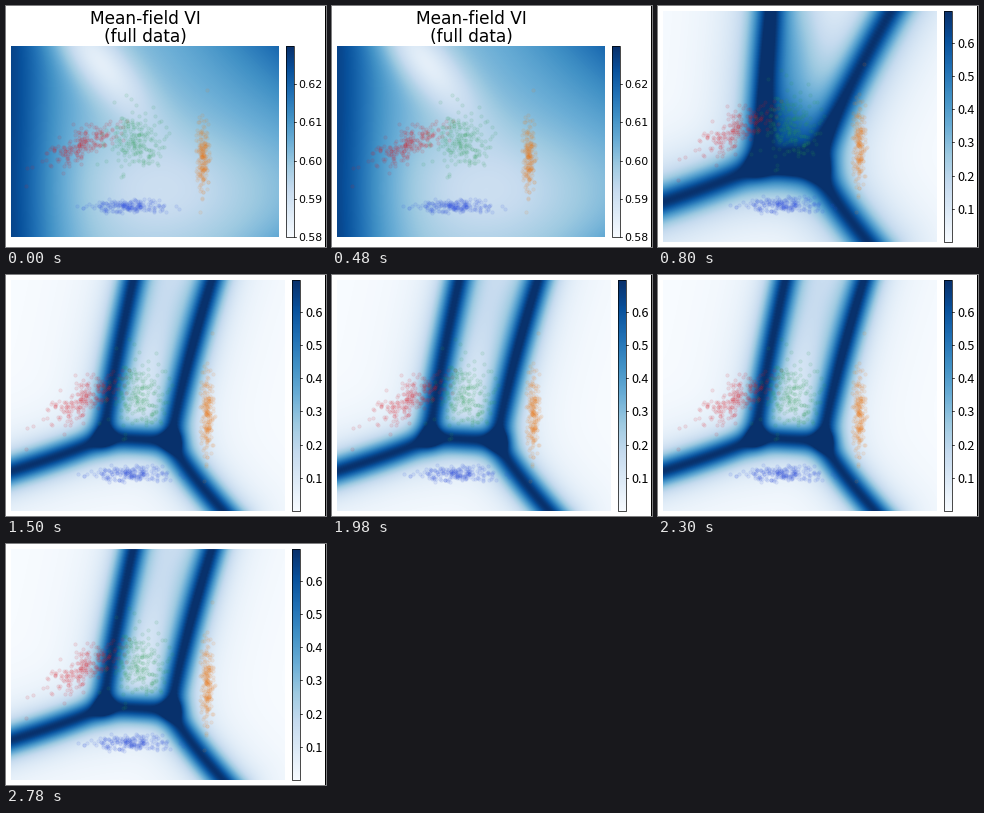
Animation, 320 px wide and 241 px high, one loop 3100 ms. Source, as a matplotlib script:

```python
import numpy as np
import matplotlib.pyplot as plt
from matplotlib.animation import ArtistAnimation
from matplotlib.patches import Rectangle

W, H, DPI = 320, 241, 72
LN2 = np.log(2)
WIDE = (5, 5, 279, 236)
TITLED = (5, 40, 273, 231)

fig = plt.figure(figsize=(W / DPI, H / DPI), dpi=DPI, facecolor="white")
ax = fig.add_axes([0, 0, 1, 1])
ax.set_axis_off()

gx, gy = np.meshgrid(np.arange(5.5, 279), np.arange(5.5, 236))


def blob(x, y, sx, sy, angle=0):
    """Gaussian bump, its long axis turned by angle degrees."""
    c, s = np.cos(np.radians(angle)), np.sin(np.radians(angle))
    u = (gx - x) * c + (gy - y) * s
    v = (gy - y) * c - (gx - x) * s
    return np.exp(-(u / sx) ** 2 / 2 - (v / sy) ** 2 / 2)


def entropy(z):
    """Binary entropy of a sigmoid at logit z."""
    return np.log1p(np.exp(-z)) + z / (1 + np.exp(z))


def ridge(start, end, width, halo):
    """Entropy around a slightly bent line that runs on past its end."""
    t = np.linspace(0, 1.15, 60)
    xs = start[0] + (end[0] - start[0]) * t ** 1.2
    ys = start[1] + (end[1] - start[1]) * t
    dist = np.sqrt(np.min([(gx - x) ** 2 + (gy - y) ** 2 for x, y in zip(xs, ys)], axis=0))
    return (1 - halo) * entropy(dist / width) + halo * entropy(dist / (3 * width))


def boundaries(left, right, tops, foot, width, halo, glow):
    """Class borders that meet in two junctions."""
    bridge_end = tuple(np.array(left) + (np.array(right) - left) / 1.15)
    links = [(left, (tops[0], 5)), (right, (tops[1], 5)), (left, (5, 196)),
             (right, (foot, 236)), (left, bridge_end)]
    total = sum(ridge(a, b, width, halo) ** 3 for a, b in links) ** (1 / 3)
    return np.minimum(LN2, total + glow)


def broad_field():
    x, y = (gx - 5) / 274, (gy - 5) / 231
    v = 0.34 + 0.58 * np.exp(-(x / 0.2) ** 1.5)
    v += 0.45 * x ** 2 * (1 - y) ** 1.5 + 0.2 * x ** 4 * y ** 4
    v -= 0.36 * blob(90, 18, 60, 20, 54) + 0.15 * blob(160, 175, 65, 45)
    return 0.58 + 0.05 * np.clip(v, 0, 1)


def cluster(rng, center, spread, slope=0, n=200):
    u, v = rng.normal(0, 1, (2, n))
    return center[0] + spread[0] * u, center[1] + spread[1] * v + slope * spread[0] * u


rng = np.random.default_rng(4)
CLUSTERS = [
    ("#e01b24", cluster(rng, (77, 124), (19, 9), -0.5)),
    ("#2ca050", cluster(rng, (133, 120), (14, 17))),
    ("#f07f1e", cluster(rng, (201, 139), (3, 20))),
    ("#3050e0", cluster(rng, (124, 198), (20, 4))),
]


def scene(field, box, low, high, ticks, digits, font, title=()):
    x0, y0, x1, y1 = box
    bar = x1 + 7
    look = dict(cmap="Blues", vmin=low, vmax=high, aspect="auto", zorder=1)
    out = [ax.imshow(field, extent=(x0, x1, y1, y0), interpolation="bilinear", **look)]
    for color, (px, py) in CLUSTERS:
        out.append(ax.scatter(x0 + (px - 5) * (x1 - x0) / 274,
                              y0 + (py - 5) * (y1 - y0) / 231,
                              s=12, c=color, linewidth=0.6, alpha=0.1, zorder=2))
    ramp = np.linspace(high, low, 256)[:, None]
    out.append(ax.imshow(ramp, extent=(bar, bar + 7.5, y1, y0), **look))
    out.append(ax.add_patch(Rectangle((bar, y0), 7.5, y1 - y0, fill=False,
                                      ec="black", lw=0.7, zorder=3)))
    for tick in ticks:
        y = y1 - (tick - low) / (high - low) * (y1 - y0)
        out += ax.plot([bar + 7.5, bar + 10], [y, y], color="black", lw=0.7)
        out.append(ax.text(316.5, y, f"{tick:.{digits}f}", ha="right",
                           va="center_baseline", **font))
    for i, line in enumerate(title):
        out.append(ax.text(139, 18 + 18 * i, line, ha="center", va="baseline",
                           family="DejaVu Sans", size=17))
    return out


small = dict(family="DejaVu Sans", size=10.9)
tall = dict(family="Noto Sans CJK JP", size=12.6)

early = boundaries((101, 158), (159, 161), (112, 233), 210, 6.6, 0.25,
                   0.2 * blob(140, 70, 22, 60) + 0.25 * blob(132, 130, 18, 28))
late = [boundaries((98, 162), (165, 166), (127, 206), 217, w, 0.15,
                   0.1 * blob(165, 25, 20, 60, 10)) for w in (5.7, 5.6)]

scenes = [scene(broad_field(), TITLED, 0.58, 0.63, np.arange(58, 63) / 100, 2,
                small, ("Mean-field VI", "(full data)"))]
scenes += [scene(f, WIDE, 0, 0.696, np.arange(1, 7) / 10, 1, tall)
           for f in [early] + late]

ax.add_patch(Rectangle((W - 1, 0), 1, H, color="black", lw=0))
ax.set_xlim(0, W)
ax.set_ylim(H, 0)

holds = (8, 7, 8, 8)
frames = [s for s, n in zip(scenes, holds) for _ in range(n)]
anim = ArtistAnimation(fig, frames, interval=100, repeat=True, repeat_delay=0)
plt.show()
```
